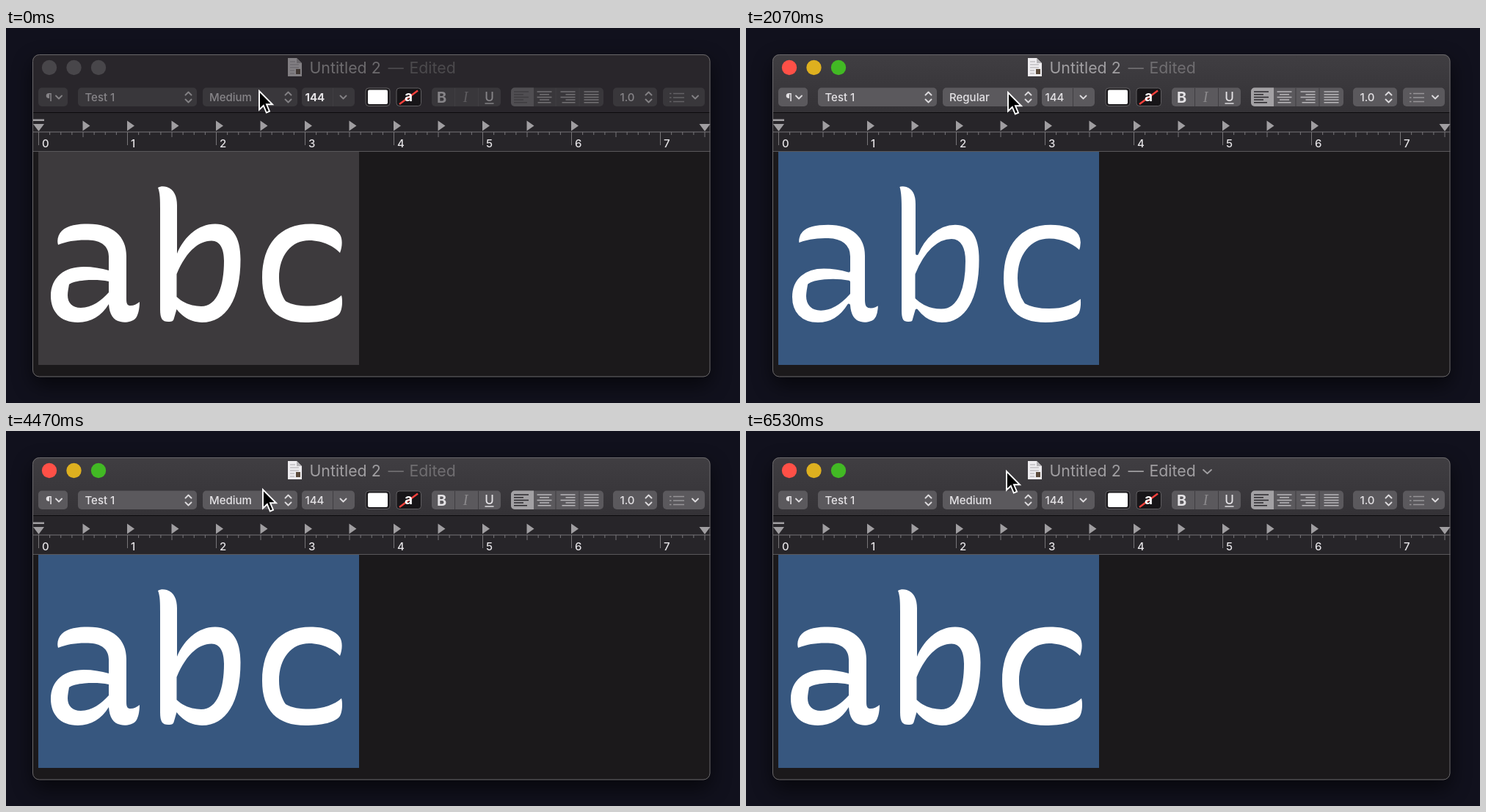
Write an HTML page that moves like this. It is 1000 px wide and 512 px high and loops after 6590 ms.

```html
<!DOCTYPE html>
<html lang="en">
<head>
<meta charset="utf-8">
<title>Font menu</title>
<style>
html, body { margin: 0; width: 100%; height: 100%; overflow: hidden; background: #11111d }
svg { display: block; width: 100%; height: 100%; font: 500 15px Inter, "Liberation Sans", sans-serif }
text { fill: #e4e2e5; white-space: pre }
.mid { text-anchor: middle }
.btn { fill: #5b595d }
.line { fill: none; stroke: #dddbde; stroke-width: 1.8; stroke-linecap: round; stroke-linejoin: round }
.thin { fill: none; stroke: #b9b7ba; stroke-width: 1.5 }
.title { font-size: 21.3px; font-weight: 400; fill: #a19fa2 }
.state { fill: #706e71 }
.hover .state { fill: #a19fa2 }
#arrow { stroke: #a19fa2; display: none }
.hover #arrow { display: inline }
#sel { fill: #37577f }
.off #sel { fill: #3d3a3d }
.off #bar { fill: #29262b }
.off .btn { fill: #39373b }
.off .light { fill: #48464a }
.off .dim { opacity: .45 }
.off .title { fill: #6d6b6e }
.off .state { fill: #4c4a4d }
.off #size { font-weight: 700 }
.off .pick { fill: #504e52 }
.regular #abc { stroke: #37577f; stroke-width: 4; stroke-linejoin: round; transform: translateY(309px) scaleY(1.022) translateY(-309px) }
</style>
</head>
<body>
<svg id="stage" viewBox="0 0 1000 512">
  <defs>
    <linearGradient id="grad" x2="0" y2="1"><stop stop-color="#403e42"/><stop offset="1" stop-color="#343236"/></linearGradient>
    <filter id="blur" x="-20%" y="-20%" width="140%" height="150%"><feGaussianBlur stdDeviation="14"/></filter>
    <clipPath id="frame"><rect x="36" y="36" width="923.5" height="440.5" rx="9"/></clipPath>
  </defs>
  <rect x="36" y="46" width="924" height="442" rx="12" opacity=".6" filter="url(#blur)"/>
  <g clip-path="url(#frame)">
    <rect x="36" y="36" width="924" height="441" fill="#1b191b"/>
    <rect id="bar" x="36" y="36" width="924" height="80" fill="url(#grad)"/>
    <rect x="36" y="115" width="924" height="54" fill="#272529"/>
    <path d="M36 115.5H960" stroke="#0c0b0d"/>
    <path d="M36 142H960" stroke="#777578"/>
    <path d="M36 168.5H960" stroke="#59575a"/>
    <rect id="sel" x="44" y="169" width="437" height="291"/>
  </g>
  <rect x="36.5" y="36.5" width="922.5" height="439.5" rx="9" fill="none" stroke="#69676a"/>
  <g id="ruler"></g>

  <circle class="light" cx="59" cy="54" r="10.2" fill="#ff5047"/>
  <circle class="light" cx="92.5" cy="54" r="10.2" fill="#deb01f"/>
  <circle class="light" cx="126" cy="54" r="10.2" fill="#42b924"/>
  <g class="dim">
    <path d="M384 41h12l7 7v18h-19z" fill="#eeecef"/>
    <path d="M396 41v7h7z" fill="#b5b3b6"/>
    <path d="M387 46h7M387 50h12M387 54h12M387 58h6M387 62h6" stroke="#aaa8ab"/>
    <rect x="395" y="56" width="6" height="7" fill="#5b4b3c"/>
  </g>
  <text class="title" x="413.5" y="62">Untitled 2</text>
  <text class="title state" x="520.5" y="62">—</text>
  <text class="title state" x="549.5" y="62">Edited</text>
  <path id="arrow" class="line" d="M623 53l5.5 5 5.5-5"/>

  <g id="buttons"></g>
  <g class="dim">
    <text class="mid" x="58.5" y="100">¶</text>
    <text x="107.5" y="100">Test 1</text>
    <text id="weight" x="277" y="100"></text>
    <text x="836.5" y="100">1.0</text>
    <text class="mid" x="593.5" y="101.500" style="font-size:20px;font-weight:700">B</text>
    <text class="mid" x="626" y="101" style="font:italic 20px 'Liberation Serif',serif;fill:#8b898c">I</text>
    <text class="mid" x="658.5" y="99.500" style="font-size:17px">U</text>
    <path class="line" d="M653 103h11" style="stroke-width:1.5"/>
    <g id="chevrons"></g>
    <g id="icons"></g>
  </g>
  <path d="M611.500 82v25M643.500 82v25M445.500 82v25M749 82v25M781 82v25" stroke="#403e42"/>
  <text id="size" x="407.500" y="100">144</text>
  <rect x="490" y="82" width="33" height="24.500" rx="4" fill="#1c1a1d" stroke="#605e61"/>
  <rect x="493" y="84.500" width="27" height="19.500" rx="2" fill="#fff"/>
  <rect x="532" y="82" width="33.500" height="24.500" rx="4" fill="#171518" stroke="#605e61"/>
  <path d="M536 104L561 85.500" stroke="#f5413c" stroke-width="2.500"/>
  <text class="mid" x="548.500" y="99.500" style="font-size:19px;font-weight:700;fill:#fff">a</text>

  <path id="abc" fill="#fff" fill-rule="evenodd" d="
    M71 296C69 290 71 282 76 277C84 269 98 267.500 112 267.500C146 267.500 164 285 164 311V370C164 378 166 379 170 379
    C174 379 178 377 182 374C182 383 180 393 176 397C172 401 162 403 156 401C146 399 141 391 140 377
    C130 393 116 402 98 402C74 402 61 387 61 366C61 340 80 326 106 326C118 326 130 328 140 331V312
    C140 298 130 290 112 289.500C97 289 83 291 71 296Z
    M140 346C130 344 119 343.500 107 344.500C97 345.500 90 347 86 350C85 356 84 360 84 365C84 375 90 382 102 382C117 382 130 372 140 361Z
    M207 218C210 216 215 216 219 217C229 220 233 230 233 242V308C241 288 260 267.500 285 267.500
    C308 267.500 319.500 285 319.500 316C319.500 370 300 402 267 402C253 402 241 395 232.500 384L229 396
    C228 400 227 401 221 401C213 401 210 397 210 384V247C210 236 210 225 207 218Z
    M232.500 336C245 306 262 290.500 280 290.500C292 290.500 297 302 297 318C297 352 288 380 266 380C254 380 242 376 232.500 367Z
    M455 307C448 299 432 290 413 290C389 290 372 310 372 341C372 355 376 366 381 373C390 378 400 379.500 413 379.500
    C433 379.500 448 373 457 365C459 372 458 384 455 389C449 398 430 402 408 402C370 402 349 382 349 341
    C349 295 373 267.500 415 267.500C432 267.500 449 272 455 282C459 289 458 299 455 307Z"/>

  <g id="menu">
    <rect x="242" y="4" width="140" height="146" rx="7" opacity=".45" filter="url(#blur)"/>
    <rect x="242.500" y=".5" width="138.500" height="144" rx="6" fill="#313033" fill-opacity=".97" stroke="#747275"/>
    <rect id="bright" x="243" width="138" height="21.800" fill="#015bdc"/>
    <path id="check" class="line" d="M252.500 0l3.500 4.500 6-9"/>
    <g id="items"></g>
  </g>
  <path id="cursor" d="M0 0V25.500L5.800 20L9.800 29.500L14 27.700L10 18.300H18Z" stroke="#fff" stroke-width="1.900" stroke-linejoin="miter"/>
</svg>
<script>
const $ = id => document.getElementById(id);
const LOOP = 6590, STEP = 200 / 3, ROW = 21.8;
const WEIGHTS = ['Light', 'Regular', 'Medium', 'SemiBold', 'Bold', 'ExtraBold'];
const OPEN = [[800, 1800], [2600, 3470], [4700, 5800]];
// Cursor tip: time, x, y
const PATH = [
  [0, 345, 86], [130, 345, 86], [200, 346, 87], [400, 346, 87], [1070, 348, 88], [1400, 355, 73],
  [1670, 356, 74], [1800, 356, 76], [2070, 357, 88], [2600, 356, 90], [3000, 355, 85], [3130, 355, 77],
  [3470, 354, 76], [4000, 351, 78], [4470, 350, 80], [4700, 351, 86], [5000, 352, 86], [5330, 353, 64],
  [5600, 354, 53], [6270, 355, 52], [6530, 355, 55], [LOOP, 355, 55]
];

function drawRuler() {
  let out = '', ticks = '', marks = 'M37 124.500h15v2.500h-15zM37 131h15l-7.500 10zM944.500 131h15l-7.500 10z';
  for (let i = 0; i <= 60; i++) {
    const x = 44.5 + i * 121 / 8;
    ticks += `M${x} 142v${i % 8 ? i % 4 ? 4 : 7 : 18}`;
    if (i % 8 == 0) out += `<text x="${x + 4.5}" y="163">${i / 8}</text>`;
    if (i % 4 == 0 && i && i <= 48) marks += `M${x - .5} 126.500l10 7-10 7z`;
  }
  $('ruler').innerHTML = `<path d="${ticks}" stroke="#777578"/><path d="${marks}" fill="#a09ea1"/>` + out;
}

function drawToolbar() {
  const boxes = [[44, 40], [98, 162], [268, 129], [403, 72], [580, 94], [688, 126], [827, 60], [895, 57]];
  $('buttons').innerHTML = boxes.map(([x, w]) =>
    `<rect class="btn" x="${x}" y="81.500" width="${w}" height="25.500" rx="5"/>`).join('') +
    '<path class="pick" d="M693 81.500h26v25.500h-26a5 5 0 0 1-5-5v-15.500a5 5 0 0 1 5-5z" fill="#a3a1a4"/>';

  const down = [72, 459.5, 939].map(x => `M${x - 4} 92.500l4 4 4-4`);
  const both = [248.5, 384.5, 875.5].map(x => `M${x - 4} 91.500l4-4 4 4M${x - 4} 97.500l4 4 4-4`);
  $('chevrons').innerHTML = `<path class="line" d="${down.join('') + both.join('')}"/>`;

  const rows = [20, 13, 20, 13, 18];
  let icons = '';
  [692, 723.5, 755.5, 787.5].forEach((x, k) => {
    let d = '';
    rows.forEach((w, i) => {
      if (k == 3) w = 20;
      d += `M${x + [0, (20 - w) / 2, 20 - w, 0][k]} ${87 + i * 3.7}h${w}`;
    });
    icons += `<path class="thin" d="${d}"${k ? '' : ' style="stroke:#2b292c"'}/>`;
  });
  const list = [89.5, 95, 100.5].map(y => `M904 ${y}h2.500M909 ${y}h15`).join('');
  $('icons').innerHTML = icons + `<path class="thin" d="${list}" style="stroke:#979598"/>`;
}

function pose(t) {
  const n = PATH.findIndex(p => p[0] > t), a = PATH[n - 1], b = PATH[n];
  const u = (t - a[0]) / (b[0] - a[0]), k = u * u * (3 - 2 * u);
  return [a[1] + (b[1] - a[1]) * k, a[2] + (b[2] - a[2]) * k];
}

function draw(now) {
  const t = Math.floor((now % LOOP + 5) / STEP) * STEP;
  const [x, y] = pose(Math.min(t, LOOP - 1));
  const weight = t >= 1800 && t < 3470 ? 1 : 2;
  const open = OPEN.some(([from, to]) => t >= from && t < to);
  const top = 77.6 - weight * ROW;
  const row = Math.max(0, Math.min(5, Math.floor((y - top - 7) / ROW)));
  $('stage').setAttribute('class', [t < 399 && 'off', weight == 1 && 'regular', t > 6390 && 'hover'].filter(Boolean).join(' '));
  $('weight').textContent = WEIGHTS[weight];
  $('menu').style.display = open ? '' : 'none';
  $('menu').setAttribute('transform', `translate(0 ${top})`);
  $('bright').setAttribute('y', 7 + row * ROW);
  $('check').setAttribute('transform', `translate(0 ${18.5 + weight * ROW})`);
  $('cursor').setAttribute('transform', `translate(${x} ${y})`);
}

drawRuler();
drawToolbar();
$('items').innerHTML = WEIGHTS.map((w, i) => `<text x="277" y="${23 + i * ROW}">${w}</text>`).join('');

const start = performance.now();
function tick() {
  draw(performance.now() - start);
  requestAnimationFrame(tick);
}
tick();
</script>
</body>
</html>
```
